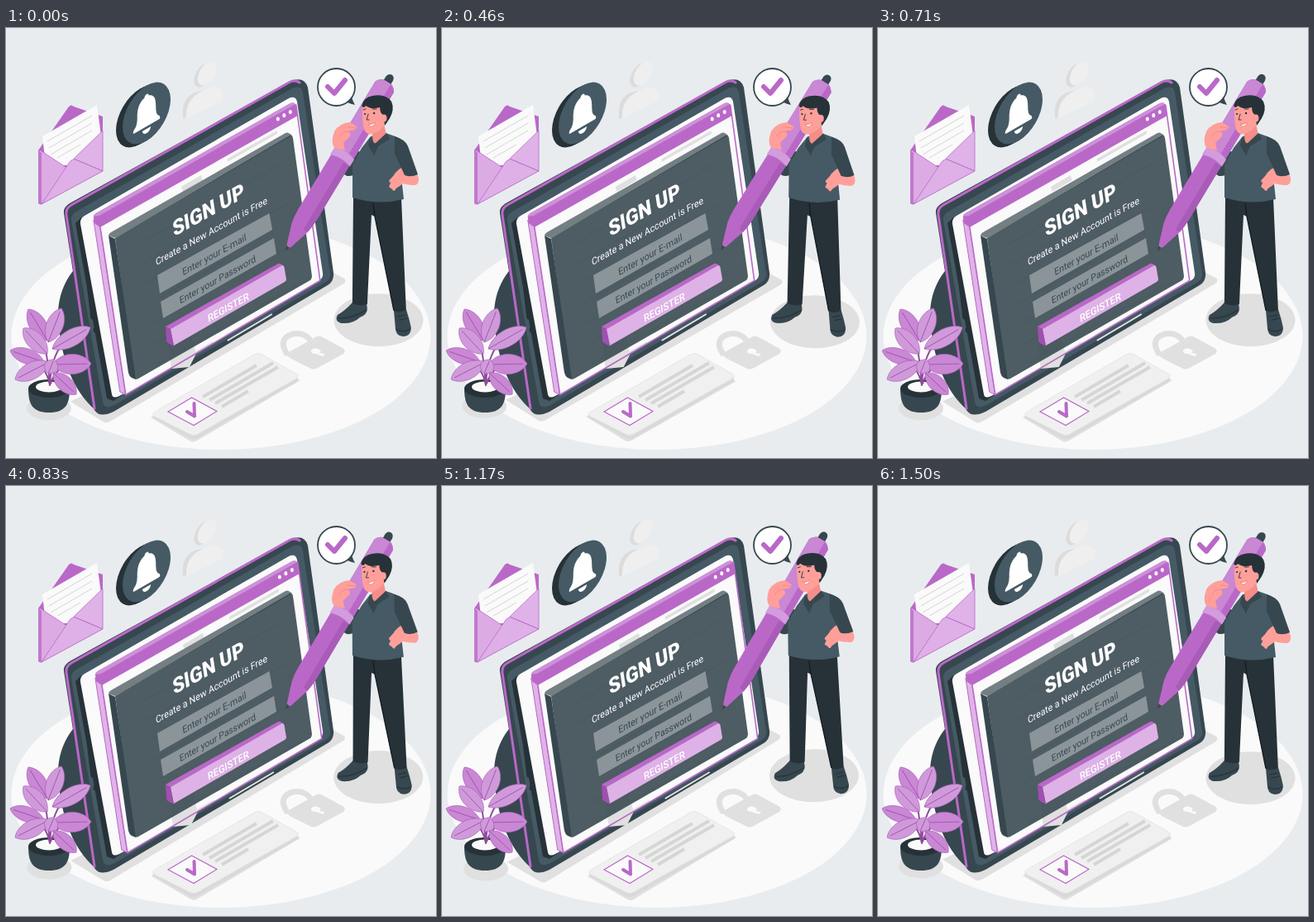
These frames come from a looping animation (520 by 520 pixels, 1.54 s). An HTML page:

```html
<!DOCTYPE html>
<html lang="en">
<head>
<meta charset="utf-8">
<title>Sign up</title>
<style>
html, body { margin: 0; width: 100%; height: 100%; overflow: hidden; background: #e8ecef; }
svg { display: block; width: 100%; height: 100%; }
text { font-family: Roboto, Arial, sans-serif; text-anchor: middle; }
.line { fill: none; stroke-linecap: round; stroke-linejoin: round; }
</style>
</head>
<body>
<svg viewBox="0 0 520 520" xmlns="http://www.w3.org/2000/svg">
  <rect width="520" height="520" fill="#e8ecef"/>
  <ellipse cx="260" cy="372.500" rx="253.500" ry="137.500" fill="#fafafa"/>

  <g id="shadows" fill="#e0e0e0">
    <ellipse cx="450.500" cy="353" rx="54" ry="32"/>
    <ellipse cx="52" cy="460" rx="27" ry="14.500"/>
    <path d="M78 452L117 476Q121 479 126 476L408 309Q413 305 408 302L394 295Z"/>
    <path d="M175 471L300 397 356 426 231 499Q227 502 222 499Z"/>
  </g>

  <!-- padlock -->
  <g>
    <path d="M339 393C333 383 334 375 344 371C354 367 364 371 369 379" class="line" stroke="#e0e0e0" stroke-width="7" stroke-linecap="butt"/>
    <path d="M342 392L374 374Q378 371 383 374L407 387Q412 390 408 394L377 411Q372 414 367 411L343 399Q338 395 342 392Z" fill="#e0e0e0"/>
    <path d="M369 390Q373 385 379 389Q382 391 379 393L386 394 383 397 375 394Q368 394 369 390Z" fill="#fafafa"/>
  </g>

  <!-- checklist card -->
  <g>
    <path d="M178 466V471L222 496Q227 499 232 496L353 427V422Z" fill="#d9d9d9"/>
    <path d="M180 464L300 395Q305 392 310 395L351 418Q356 421 351 424L232 491Q227 494 222 491L180 470Q175 467 180 464Z" fill="#f0f0f0" stroke="#e2e2e2" stroke-width=".8"/>
    <path d="M196 464L224.500 447 255 463.500 227 480.500Z" fill="#fafafa" stroke="#ba68c8" stroke-width="1.200"/>
    <path d="M219 464L228 469.500 227.500 454" class="line" stroke="#ba68c8" stroke-width="4" stroke-linecap="butt"/>
    <path d="M238 446L303 408M246 450L323 405M253 454L329 410M261 458L293 439" stroke="#d6d6d6" stroke-width="4"/>
  </g>

  <!-- tablet -->
  <path d="M84 290C69 308 60 330 64 362C68 400 80 438 108 462L118 460 92 300Z" fill="#37474f"/>
  <path d="M70 224Q69 217 77 212L345 64Q361 58 365 72L396 296Q397 306 389 311L130 464Q113 472 107 462Z" fill="#37474f"/>
  <path d="M107 460L73 226Q72 218 79 214L343 65.500Q350 62 355 66" class="line" stroke="#ba68c8" stroke-width="3"/>
  <path d="M79 233Q78 226 85 222L346 73Q357 68 359 78L392 297Q393 303 387 307L133 455Q119 463 117 452Z" fill="#455a64"/>
  <path d="M84 236L91 229 132 444 140 444 130 451 122 448Z" fill="#263238"/>
  <path d="M90 237Q89 231 95 227L342 85Q350 81 352 89L383 296Q384 302 379 305L137 445Q129 449 128 443Z" fill="#fafafa"/>
  <path d="M101 316L105 350" class="line" stroke="#263238" stroke-width="5.500"/>
  <ellipse cx="108.500" cy="365" rx="2.800" ry="3.600" fill="#263238"/>

  <!-- browser window -->
  <g id="win">
    <path d="M106 232L114 240 145 443.500 138 440Z" fill="#e0b3e8" stroke="#ba68c8" stroke-width="1"/>
    <path d="M114 240L352 106 380 305 145 443.500Z" fill="#fafafa"/>
    <path id="rows" stroke="#e6e6e6" stroke-width="3"/>
    <path d="M212 192L236 178 238 184 214 198ZM196 378L222 364 230 394 222 410 200 412ZM268 158L328 124 328 128 268 162Z" fill="#e0e0e0"/>
    <path d="M226 394L250 380M265 372L334 332M268 378L322 346" stroke="#e3e3e3" stroke-width="2"/>
    <path d="M351 93L380 305.500 145 443.500 114 240" class="line" stroke="#ba68c8" stroke-width="1.600"/>
    <path d="M106 228Q106 226 109 224L344 91Q350 89 351 94L353 106 114 241 107 236Z" fill="#ba68c8"/>
    <path d="M106 228Q106 226 109 224L344 91Q348 89 350 92L113 227Z" fill="#cd91d8"/>
    <g fill="#fff">
      <ellipse cx="329" cy="110" rx="2" ry="2.600"/><ellipse cx="336.500" cy="105.700" rx="2" ry="2.600"/><ellipse cx="344" cy="101.500" rx="2" ry="2.600"/>
    </g>
  </g>

  <!-- sign-up panel -->
  <g>
    <path d="M124 251L132 255 157 425 152 423Q149 421 148 417Z" fill="#37474f"/>
    <path d="M124 251Q124 249 127 247L338 127Q341 125 346 130L132 254Z" fill="#737f83"/>
    <path d="M132 254L343 130Q346 129 347 133L370 300Q370 303 368 305L160 424Q156 426 155 422Z" fill="#37474f" opacity=".88"/>
    <path d="M183 299L318.500 224 322 244 186 321ZM187 331L324 254 327 273 190 351Z" fill="#8b9599"/>
    <path d="M193 361L199 364 203 385 196 381Q194 380 194 378Z" fill="#9f4fb0"/>
    <path d="M193 361L329 285Q331 284 335 287L199 364Z" fill="#ba68c8"/>
    <path d="M199 364L334 287Q336 287 336.500 289L339 304Q339 306 337 307L203 384Z" fill="#deb2e6"/>
    <g id="labels"></g>
  </g>

  <!-- plant -->
  <g>
    <path d="M27 436C27 455 32 465 52 465C72 465 77 455 77 436Z" fill="#37474f"/>
    <ellipse cx="52" cy="436" rx="25" ry="11" fill="#263238"/>
    <ellipse cx="52" cy="434" rx="16" ry="6.500" fill="#fafafa"/>
    <path d="M53 432C52 410 48 385 41 364M53 432C54 405 62 385 74 378M53 432C50 412 38 405 24 396M54 430Q60 410 80 406" class="line" stroke="#8e4a9c" stroke-width="2"/>
    <g id="leaves"></g>
  </g>

  <!-- envelope -->
  <g>
    <path d="M39 148L76 95Q79 92 82 95L117 107V173L43 213Q39 214 39 210Z" fill="#ba68c8"/>
    <path d="M44 131L110 93 117 145 82 166 48 166Z" fill="#fafafa"/>
    <path d="M50 137L104 106M52 145L104 115M54 153L104 124M62 157L90 141" stroke="#d5d5d5" stroke-width="1"/>
    <path d="M117 124V173L82 158Z" fill="#e0b3e8" stroke="#ba68c8" stroke-width=".8"/>
    <path d="M40 147L75 170 43 213Q40 213 40 210Z" fill="#dcabe4" stroke="#ba68c8" stroke-width=".8"/>
    <path d="M43 213L75 165Q80 156 86 160L117 173Z" fill="#deb0e7" stroke="#ba68c8" stroke-width=".8"/>
    <path d="M39 148L43 151V213Q39 214 39 210Z" fill="#c078cd"/>
  </g>

  <!-- bell -->
  <g>
    <circle r="33.500" transform="matrix(.866 -.5 0 1 162 107)" fill="#263238"/>
    <circle r="33.500" transform="matrix(.866 -.5 0 1 166 105)" fill="#263238"/>
    <circle r="33.500" transform="matrix(.866 -.5 0 1 170 103)" fill="#455a64"/>
    <path transform="matrix(.866 -.5 0 1 170 104)" fill="#fff" d="M-3-21A3 3 0 0 1 3-21C12-18 13-10 13-2C13 6 15 9 18 11Q20 15 17 15H-17Q-20 15 -18 11C-15 9 -13 6 -13-2C-13-10 -12-18 -3-21ZM-6 18H6C5 25 -5 25 -6 18Z"/>
  </g>

  <!-- user icon -->
  <g>
    <g fill="#dcdcdc">
      <circle r="13" transform="matrix(.866 -.5 0 1 238.500 57)"/>
      <path d="M214 110V100C214 86 224 77 238 76C250 70 262 76 262 86Z"/>
    </g>
    <g fill="#efefef">
      <circle r="13" transform="matrix(.866 -.5 0 1 243 55)"/>
      <path d="M218 109Q217 92 228 82Q238 75 248 72Q262 70 263 84Q263 87 260 89Z"/>
    </g>
  </g>

  <!-- man with pen -->
  <g id="man">
    <path d="M421 148Q410 160 408 176Q412 181 420 178L430 150Z" fill="#37474f"/>
    <g transform="translate(338 270) rotate(-59)">
      <path d="M0 0L10-3V3Z" fill="#37474f"/>
      <path d="M7-2.500L33-11Q42-13 52-13L232-13Q240-9 240 0Q240 9 232 13L52 13Q42 13 33 11L7 3Q5 0 7-2.500Z" fill="#ba68c8"/>
      <path d="M140-13H232Q240-9 240 0Q240 9 232 13H140Z" fill="#c987d4"/>
      <path d="M140 5H238Q236 11 232 13H140Z" fill="#ba68c8"/>
      <path d="M34 5H128V13H52Q42 13 33 11Z" fill="#a95bb8"/>
      <path d="M128-14Q133 0 128 14H138Q143 0 138-14Z" fill="#d39cdd"/>
      <path d="M239-5H244Q249-4 249 0Q249 4 244 5H239Z" fill="#37474f"/>
    </g>
    <path d="M419 332Q410 342 401 347Q397 355 406 357Q420 358 428 350Q437 347 437 339L436 332Z" fill="#37474f"/>
    <path d="M469 340L484 340Q488 352 490 362Q490 373 480 373Q471 372 471 362Z" fill="#37474f"/>
    <path d="M402 351Q418 352 436 341M472 364Q480 369 489 364M474 349L483 347M476 353L485 351" class="line" stroke="#263238" stroke-width="1.200"/>
    <path d="M420 202Q450 212 478 205L480 250 484 341Q476 345 469 342L446 228 442 226 437 334Q428 337 419 333Z" fill="#263238"/>
    <path d="M444 212L446 228 469 341" class="line" stroke="#11191d" stroke-width="1.200"/>
    <path d="M441 131L430 145 419 165 419 205Q450 215 481 207L478 180 480 136Q470 130 459 127Z" fill="#455a64"/>
    <path d="M497 176Q502 187 495 190Q486 190 480 188Q472 195 467 195L463 192 470 176 475 171Q484 165 490 168L482 177Z" fill="#ff9f9a"/>
    <path d="M476 173L465 185M479 186Q472 190 469 195M490 169L480 177" class="line" stroke="#ff9f9a" stroke-width="3.500"/>
    <path d="M470 131Q483 135 486 143L498 177Q490 181 482 178L470 152Z" fill="#37474f"/>
    <path d="M442 121L457 116 460 130Q452 141 444 139Z" fill="#f58d89"/>
    <path d="M440 132L446 140 460 127 464 134 450 143 445 154 438 142Z" fill="#37474f"/>
    <path d="M431 94Q445 83 457 94L460 112Q457 122 446 127Q437 131 433 123Q430 111 431 94Z" fill="#ff9f9a"/>
    <path d="M430 94Q432 84 443 82Q459 79 466 89Q470 98 464 109L458 118 456 105Q452 103 452 96Q441 99 435 94Q432 98 430 94Z" fill="#263238"/>
    <ellipse cx="457" cy="109" rx="3.400" ry="4.500" fill="#ff9f9a"/>
    <circle cx="434" cy="104" r="1.100" fill="#263238"/><circle cx="445" cy="103" r="1.200" fill="#263238"/>
    <path d="M432 99L435 98M443 98L448 98M438 104L436 111 439 111" class="line" stroke="#263238" stroke-width=".9"/>
    <path d="M438 116Q442 118 446 114Q445 119 441 119Z" fill="#fff" stroke="#c9605f" stroke-width=".5"/>
    <path d="M397 145Q392 138 397 125Q403 115 416 114L424 119Q425 123 419 124L412 125Q418 126 416 131L408 139 410 148Z" fill="#ff9f9a"/>
    <path d="M412 125Q406 126 404 131M423 121L414 120" class="line" stroke="#f07f7d" stroke-width=".8"/>
  </g>

  <!-- speech bubble -->
  <path d="M413 90Q417 92 422 93Q419 88 418 83Z" fill="#37474f"/>
  <circle cx="399.500" cy="71.500" r="22.500" fill="#fff" stroke="#37474f" stroke-width="1.800"/>
  <path d="M389 71L397 79 410 63" class="line" stroke="#ba68c8" stroke-width="6"/>
</svg>
<script>
const $ = id => document.getElementById(id);

// Labels lie on the panel plane: centre x, baseline y, size, weight, colour
const label = (txt, x, y, size, weight, fill) =>
  `<text transform="matrix(.873 -.488 .15 .98 ${x} ${y})" font-size="${size}" font-weight="${weight}" fill="${fill}">${txt}</text>`;
$('labels').innerHTML =
  label('SIGN UP', 246, 228.5, 25.5, 900, '#fff') +
  label('Create a New Account is Free', 249, 249.5, 11.8, 400, '#fff') +
  label('Enter your E-mail', 252.5, 278, 11.8, 400, '#37474f') +
  label('Enter your Password', 256.5, 308, 11.5, 400, '#37474f') +
  label('REGISTER', 269.5, 342, 12.5, 500, '#fff');

// Leaf from base to tip with half-width w
function leaf(bx, by, tx, ty, w, fill) {
  const len = Math.hypot(tx - bx, ty - by);
  const turn = Math.atan2(ty - by, tx - bx) * 180 / Math.PI;
  return `<g transform="translate(${bx} ${by}) rotate(${turn})">
    <path d="M0 0C${len * .25} ${-w * 1.4} ${len * .8} ${-w * 1.3} ${len} 0C${len * .8} ${w * 1.3} ${len * .25} ${w * 1.4} 0 0Z" fill="${fill}" stroke="#a95bb8" stroke-width=".6"/>
    <path d="M0 0H${len * .9}" stroke="#9c4fac" stroke-width=".8"/></g>`;
}
const mid = '#c987d4', pale = '#d09ada';
$('leaves').innerHTML =
  leaf(50, 378, 27, 340, 10, mid) +
  leaf(51, 380, 67, 339, 10, pale) +
  leaf(50, 394, 21, 363, 10, pale) +
  leaf(56, 388, 102, 362, 10, pale) +
  leaf(46, 404, 5, 390, 9, mid) +
  leaf(52, 404, 11, 425, 10, pale) +
  leaf(56, 407, 103, 406, 12, mid) +
  leaf(57, 417, 85, 443, 9, mid) +
  leaf(51, 418, 58, 401, 8, pale);

let rows = '';
for (let i = 0; i < 7; i++) {
  const x = 160 + i * 4, y = 262 + i * 24;
  rows += `M${x} ${y}l${i % 2 ? 90 : 175} ${i % 2 ? -51 : -99}`;
}
$('rows').setAttribute('d', rows);

const LOOP = 1540, STEP = 1000 / 24, PERIOD = 1500, LEAD = 25;
const SHAKE = [0, -1, 2, -4, 4, -4, 4, -4, 2, -1, 0];

// Piecewise-linear sway in degrees: 0, 1, -1, 0
const sway = p => p < .25 ? p * 4 : p < .75 ? 2 - p * 4 : p * 4 - 4;

function shake(p) {
  const k = Math.floor(p * 10), f = p * 10 - k;
  return (SHAKE[k] + (SHAKE[k + 1] - SHAKE[k]) * f) * 1.04;
}

function draw(ms) {
  const n = Math.floor((ms % LOOP + 4.9) / STEP);
  const p = (n * STEP + LEAD) / PERIOD % 1;
  const turn = sway(p);
  $('man').setAttribute('transform', `rotate(${turn} 421 220)`);
  $('shadows').setAttribute('transform', `rotate(${turn} 265 392)`);
  $('win').setAttribute('transform', `translate(${shake(p)} 0)`);
}

let start;
function tick(now) {
  start ??= now;
  draw(now - start);
  requestAnimationFrame(tick);
}
draw(0);
requestAnimationFrame(tick);
</script>
</body>
</html>
```
